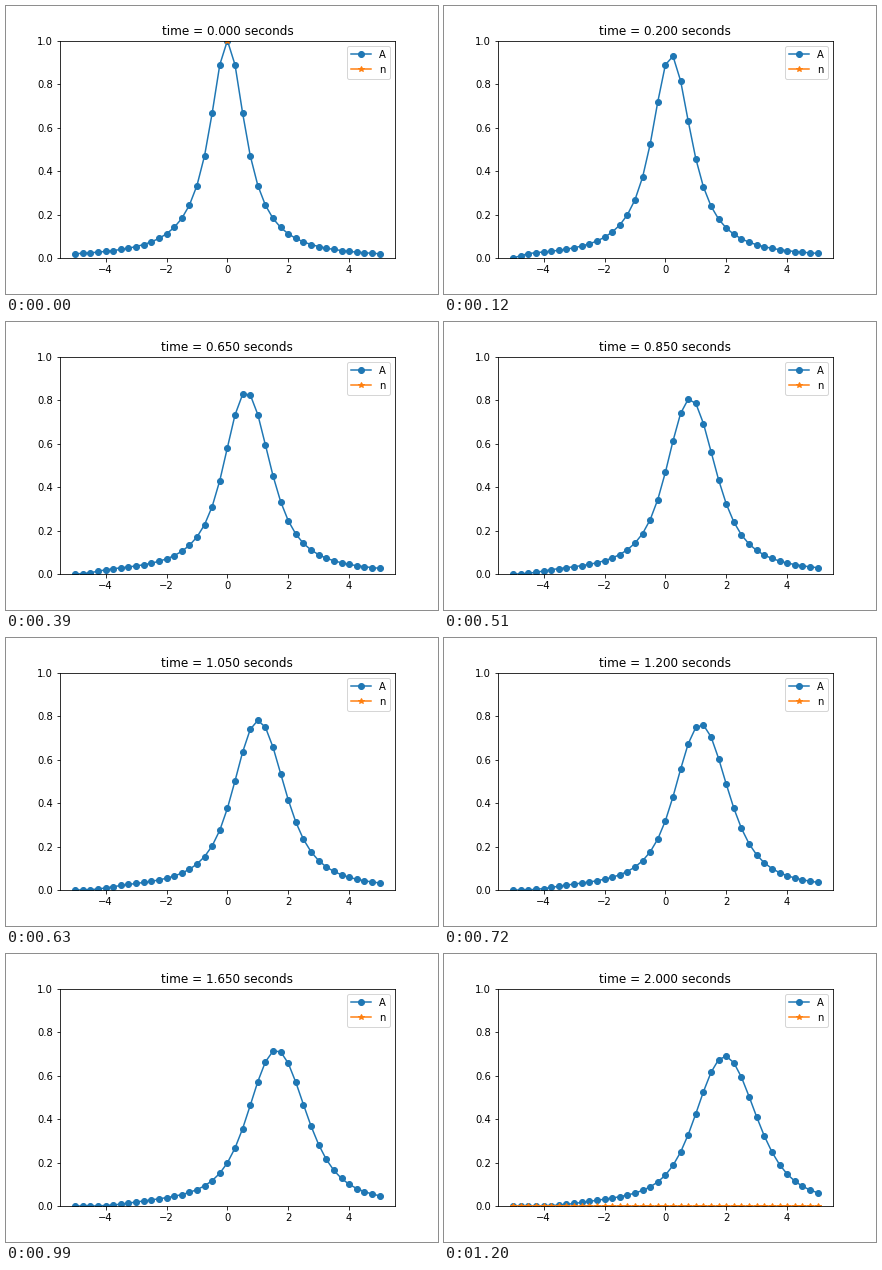
A matplotlib script that plays this animation: 432 by 288 pixels, repeating every 1.23 s.

```python
import numpy as np
import matplotlib.pyplot as plt
from matplotlib.animation import FuncAnimation

DT, DX, SPEED = 0.05, 0.25, 1.0
STEPS = 41

x = np.linspace(-5, 5, 41)


def solve():
    """Upwind advection of a bell curve with zero inflow on the left."""
    courant = SPEED * DT / DX
    A = np.zeros((STEPS, x.size))
    n = np.zeros_like(A)
    A[0] = 1 / (1 + 2 * x**2)
    for i in range(STEPS - 1):
        A[i + 1, 1:] = A[i, 1:] - courant * (A[i, 1:] - A[i, :-1])
        n[i] = 1 / np.maximum(A[i], 1e-3)
    return A, n  # the last row of n stays zero


A, n = solve()

fig, ax = plt.subplots(figsize=(6, 4), dpi=72)
fig.subplots_adjust(left=0.125, right=0.9, bottom=0.125, top=0.88)
line_a, = ax.plot(x, A[0], "o-", label="A")
line_n, = ax.plot(x, n[0], "*-", label="n")
ax.set_xlim(-5.5, 5.5)
ax.set_ylim(0, 1)
ax.legend(loc="upper right")
title = ax.set_title("")


def update(i):
    line_a.set_ydata(A[i])
    line_n.set_ydata(n[i])
    title.set_text(f"time = {i * DT:.3f} seconds")
    return line_a, line_n, title


anim = FuncAnimation(fig, update, frames=STEPS, interval=30, repeat=True)
plt.show()
```
